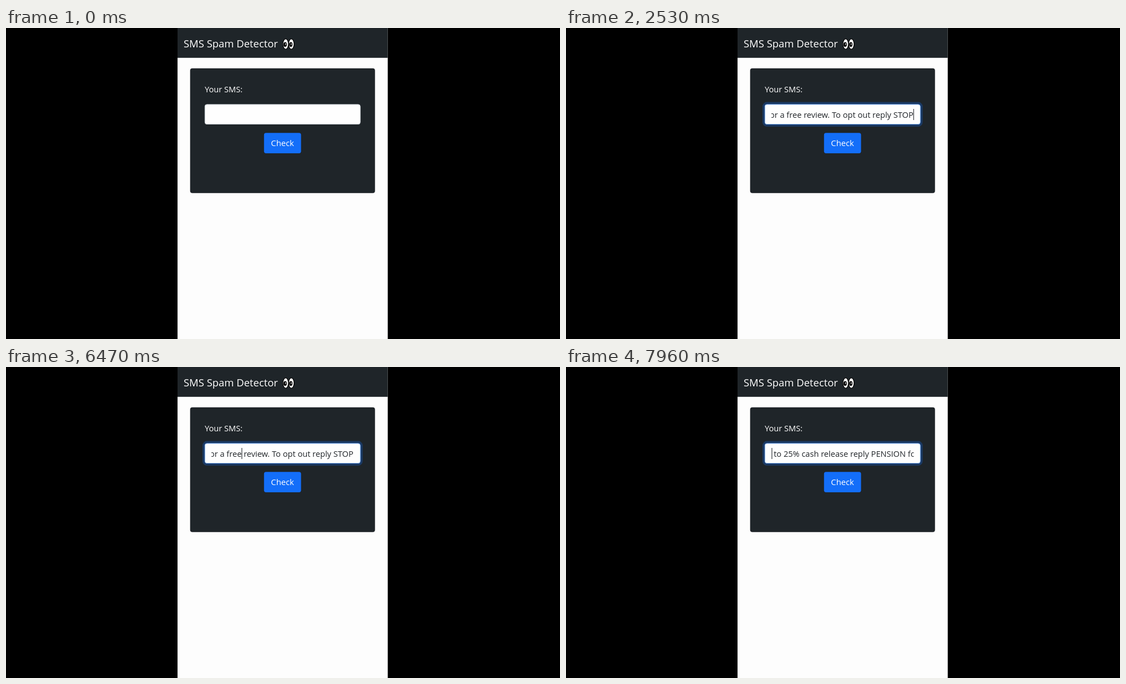
An HTML page that plays this animation: 998 by 561 pixels, repeating every 7990 ms.

```html
<!DOCTYPE html>
<html lang="en">
<head>
<meta charset="utf-8">
<title>SMS Spam Detector</title>
<style>
  html, body { margin: 0; width: 100%; height: 100%; overflow: hidden; background: #000; }
  svg { display: block; width: 100vw; height: 100vh; }
  text { font-family: "Open Sans", "Noto Sans", sans-serif; font-size: 14.6px; white-space: pre; }
</style>
</head>
<body>
<svg viewBox="0 0 998 561">
  <defs>
    <clipPath id="inner"><rect x="370" y="139" width="256.5" height="34"/></clipPath>
  </defs>
  <rect width="998" height="561" fill="#000"/>
  <rect x="309" width="378.7" height="561" fill="#fdfdfd"/>

  <rect x="309" width="378.7" height="53.8" fill="#1f2529"/>
  <text x="320" y="34.8" fill="#fff" style="font-size:18.45px">SMS Spam Detector</text>
  <g stroke="#000" stroke-width="1.2" fill="#fff">
    <ellipse cx="503.8" cy="29" rx="4.9" ry="9.3"/>
    <ellipse cx="514" cy="29" rx="4.9" ry="9.3"/>
  </g>
  <g fill="#000">
    <ellipse cx="502.9" cy="29.8" rx="3" ry="4.2"/>
    <ellipse cx="513.1" cy="29.8" rx="3" ry="4.2"/>
  </g>
  <g fill="#fff">
    <circle cx="503.6" cy="29" r="1.1"/>
    <circle cx="513.8" cy="29" r="1.1"/>
  </g>

  <rect x="331.7" y="72.8" width="333" height="225" rx="4" fill="#191c22"/>
  <rect x="332.5" y="73.5" width="331.4" height="223.3" rx="3.4" fill="#1f2529"/>
  <text x="358" y="116.4" fill="#fff">Your SMS:</text>

  <rect id="ring" fill="#0d6efd" fill-opacity=".27"/>
  <rect id="field" x="358.3" y="137.9" width="279.9" height="35.6" rx="3.6" fill="#fefefe"/>
  <g clip-path="url(#inner)">
    <text id="msg" y="161.5" fill="#212529">up to 25% cash release reply PENSION for a free review. To opt out reply STOP</text>
  </g>
  <rect id="caret" y="146" width="1.1" height="20" fill="#212529"/>

  <rect x="464.8" y="189.3" width="66.7" height="36.6" rx="3.6" fill="#136ef9"/>
  <text x="477.3" y="213.3" fill="#fff" style="font-size:14.8px">Check</text>
</svg>
<script>
const $ = id => document.getElementById(id);
const ring = $('ring'), field = $('field'), msg = $('msg'), caret = $('caret');

const LOOP = 7990, FOCUS = 1510, PASTE = 2150;
const PRESS = 5030, REPEAT = 5530, STEP = 33.2;   // left arrow held down
const BLINK = 530, LEFT = 370.4, RIGHT = 625.7;
const length = msg.textContent.length;

const set = (el, attrs) => {
  for (const k in attrs) el.setAttribute(k, attrs[k]);
};
const mix = (a, b, p) => `rgb(${a.map((v, i) => Math.round(v + (b[i] - v) * p))})`;
const widthOf = n => n > 0 ? msg.getSubStringLength(0, n) : 0;

function drawField(t) {
  const p = Math.min(1, Math.max(0, (t - FOCUS) / 150));
  const ease = p * p * (3 - 2 * p), s = 3.8 * ease;
  set(field, { stroke: mix([206, 212, 218], [134, 183, 254], Math.sqrt(ease)) });
  set(ring, {
    x: 357.8 - s, y: 137.4 - s, width: 280.9 + 2 * s, height: 36.6 + 2 * s,
    rx: 4 + s, visibility: p > 0 ? 'visible' : 'hidden'
  });
}

function movesAt(t) {
  if (t < PRESS) return 0;
  if (t < REPEAT) return 1;
  return 2 + Math.floor((t - REPEAT) / STEP);
}

function drawText(t) {
  const pasted = t >= PASTE;
  let x = LEFT;
  if (pasted) {
    const offset = widthOf(Math.max(0, length - movesAt(t)));
    const start = Math.max(RIGHT - widthOf(length), LEFT - offset);
    set(msg, { x: start });
    x = start + offset;
  }
  const since = t - (t >= PRESS ? t : pasted ? PASTE : FOCUS);
  const on = t >= FOCUS && since % (2 * BLINK) < BLINK;
  set(msg, { visibility: pasted ? 'visible' : 'hidden' });
  set(caret, { x, visibility: on ? 'visible' : 'hidden' });
}

function render(t) {
  drawField(t);
  drawText(t);
}

const begin = performance.now();
function tick() {
  render((performance.now() - begin) % LOOP);
  requestAnimationFrame(tick);
}
tick();
</script>
</body>
</html>
```
